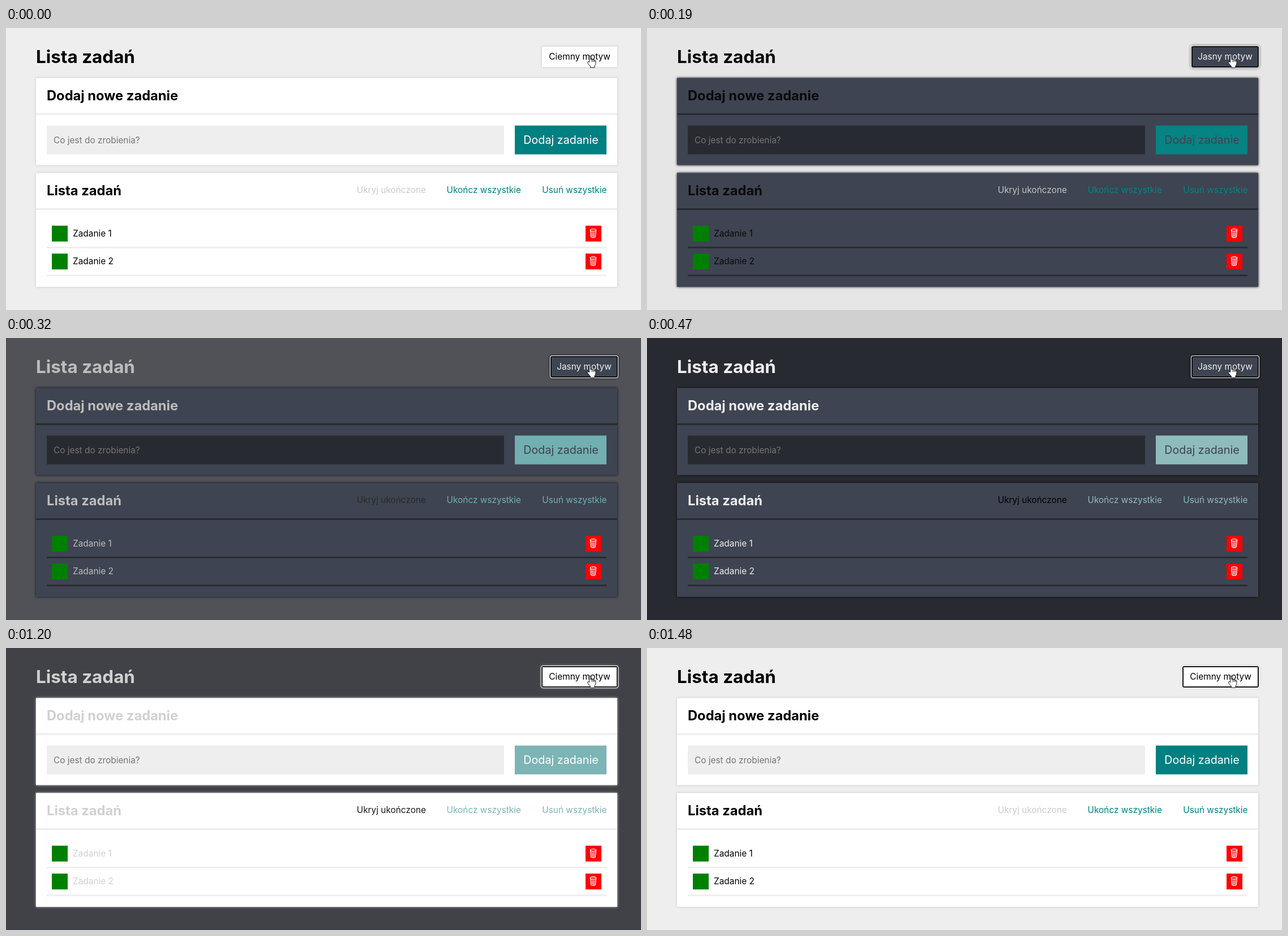
Recreate the animation shown at these times as an HTML page. Size 1122 by 499 pixels, loop 2.14 s.

```html
<!DOCTYPE html>
<html lang="pl">
<head>
<meta charset="utf-8">
<title>Lista zadań</title>
<style>
  html, body { margin: 0; width: 100%; height: 100%; overflow: hidden; }
  body {
    --panel: #fff; --field: #eee; --shadow: #c4c4c4; --label: #000;
    position: relative; background: var(--bg);
    font: 15.4px Inter, "Open Sans", sans-serif;
  }
  body.dark { --panel: #3e4451; --field: #282a31; --shadow: #0c0d10; --label: #eee; }
  svg { position: absolute; left: 0; top: 0; }
  text { fill: var(--text); }
  h1, .h1 { font-size: 31.4px; font-weight: 700; }
  .h2 { font-size: 23.7px; font-weight: 700; }
  .panel { fill: var(--panel); filter: drop-shadow(0 0 2px var(--shadow)); }
  .field { fill: var(--field); }
  .hint { fill: #757575; }
  .accent { fill: var(--accent); }
  .muted { fill: var(--muted); }
  .add { font-size: 19.7px; fill: var(--panel); text-anchor: middle; }
  .end { text-anchor: end; }
  #theme {
    position: absolute; left: 947px; top: 33px; width: 133px; height: 36px;
    line-height: 35px; text-align: center; white-space: nowrap;
    background: var(--panel); color: var(--label);
    box-shadow: 0 0 4px var(--shadow);
  }
  .dark #theme { left: 963px; width: 117px; }
  .focus #theme {
    border-radius: 2px;
    box-shadow: inset 0 0 0 1px #101010, 0 0 0 1px #101010, 0 0 0 2px #fff, 0 0 5px 1px var(--shadow);
  }
  #press { fill: #ff0; opacity: .55; visibility: hidden; }
  .pressed #press { visibility: visible; }
</style>
</head>
<body>
<div id="theme"></div>
<svg width="1122" height="499" viewBox="0 0 1122 499">
  <defs>
    <g id="task">
      <rect x="81" y="0" width="28" height="28" fill="green"/>
      <rect x="1024" y="0" width="28" height="28" fill="red"/>
      <g fill="none" stroke="#fff">
        <ellipse cx="1037.5" cy="7.8" rx="5.2" ry="2" stroke-width="1.3"/>
        <path d="M1032.6 9 L1033.7 20 Q1037.5 22.4 1041.3 20 L1042.4 9" stroke-width="1.3"/>
        <path d="M1035.2 11 L1035.7 19.5 M1037.5 11.3 V20 M1039.8 11 L1039.3 19.5"/>
      </g>
      <rect class="field" x="72" y="37.2" width="989" height="2.8"/>
    </g>
  </defs>

  <text class="h1" x="53" y="61.5">Lista zadań</text>

  <rect class="panel" x="53" y="88.5" width="1027" height="154"/>
  <text class="h2" x="72" y="128">Dodaj nowe zadanie</text>
  <rect class="field" x="53" y="151" width="1027" height="3"/>
  <rect class="field" x="72" y="172.6" width="808" height="51"/>
  <text class="hint" x="84" y="203.5">Co jest do zrobienia?</text>
  <rect class="accent" x="899" y="172.6" width="162" height="51"/>
  <text class="add" x="980.5" y="204.5">Dodaj zadanie</text>

  <rect class="panel" x="53" y="256.5" width="1027" height="201.5"/>
  <text class="h2" x="72" y="296">Lista zadań</text>
  <text class="muted end" x="742" y="292">Ukryj ukończone</text>
  <text class="accent end" x="910" y="292">Ukończ wszystkie</text>
  <text class="accent end" x="1061.5" y="292">Usuń wszystkie</text>
  <rect class="field" x="53" y="319" width="1027" height="3"/>

  <use href="#task" y="349.8"/>
  <text x="118" y="368.5">Zadanie 1</text>
  <use href="#task" y="399.2"/>
  <text x="118" y="418">Zadanie 2</text>

  <circle id="press" cx="1031.5" cy="48" r="11.5"/>
  <path transform="translate(1026 48)" fill="#fff" stroke="#000" stroke-linejoin="round"
    d="M4.5 13 V2 Q5.7 .2 7 2 V8 Q8.3 6.3 9.4 8 Q10.8 6.8 11.8 8.5 Q13 7.5 14 9 Q16 8.6 16 11 V14
       Q16 17 14 19 V22 H6.5 V20 L1.8 14.3 Q.7 12 2.2 11.4 Q3.4 11.3 4.5 13 Z M9.4 8 V12 M11.8 8.5 V12 M14 9 V12"
    stroke-width=".9"/>
</svg>
<script>
  const LOOP = 2140, FADE = 300;
  const toDark = { down: 30, up: 172 }, toLight = { down: 1070, up: 1165 };
  // The screen refreshes only at these moments.
  const ticks = [0, 30, 80, 130, 190, 240, 270, 320, 390, 470,
    1070, 1165, 1200, 1260, 1310, 1370, 1430, 1480];
  const colors = {
    bg: [[238, 238, 238], [40, 42, 49]],
    text: [[0, 0, 0], [238, 238, 238]],
    accent: [[0, 128, 128], [142, 187, 188]],
    muted: [[204, 204, 204], [0, 0, 0]]
  };
  const body = document.body, theme = document.getElementById('theme');

  // CSS "ease": cubic-bezier(.25, .1, .25, 1)
  function ease(x) {
    if (x <= 0) return 0;
    if (x >= 1) return 1;
    const bez = (a, b, u) => 3 * a * u * (1 - u) ** 2 + 3 * b * u * u * (1 - u) + u ** 3;
    let lo = 0, hi = 1;
    for (let i = 0; i < 20; i++) {
      const mid = (lo + hi) / 2;
      if (bez(.25, .25, mid) < x) lo = mid; else hi = mid;
    }
    return bez(.1, 1, lo);
  }

  const mix = ([a, b], k) => `rgb(${a.map((v, i) => Math.round(v + (b[i] - v) * k))})`;
  const held = (click, t) => t >= click.down && t < click.up;

  function draw(now) {
    const time = now % LOOP;
    const t = ticks.filter(tick => tick <= time).pop();
    const dark = t >= toDark.up && t < toLight.up;
    const k = ease((t - toDark.up) / FADE) - ease((t - toLight.up) / FADE);
    body.classList.toggle('dark', dark);
    body.classList.toggle('focus', t >= toDark.down);
    body.classList.toggle('pressed', held(toDark, t) || held(toLight, t));
    for (const name in colors) body.style.setProperty('--' + name, mix(colors[name], k));
    theme.textContent = dark ? 'Jasny motyw' : 'Ciemny motyw';
  }

  const start = performance.now();
  function frame() {
    draw(performance.now() - start);
    requestAnimationFrame(frame);
  }
  frame();
</script>
</body>
</html>
```
